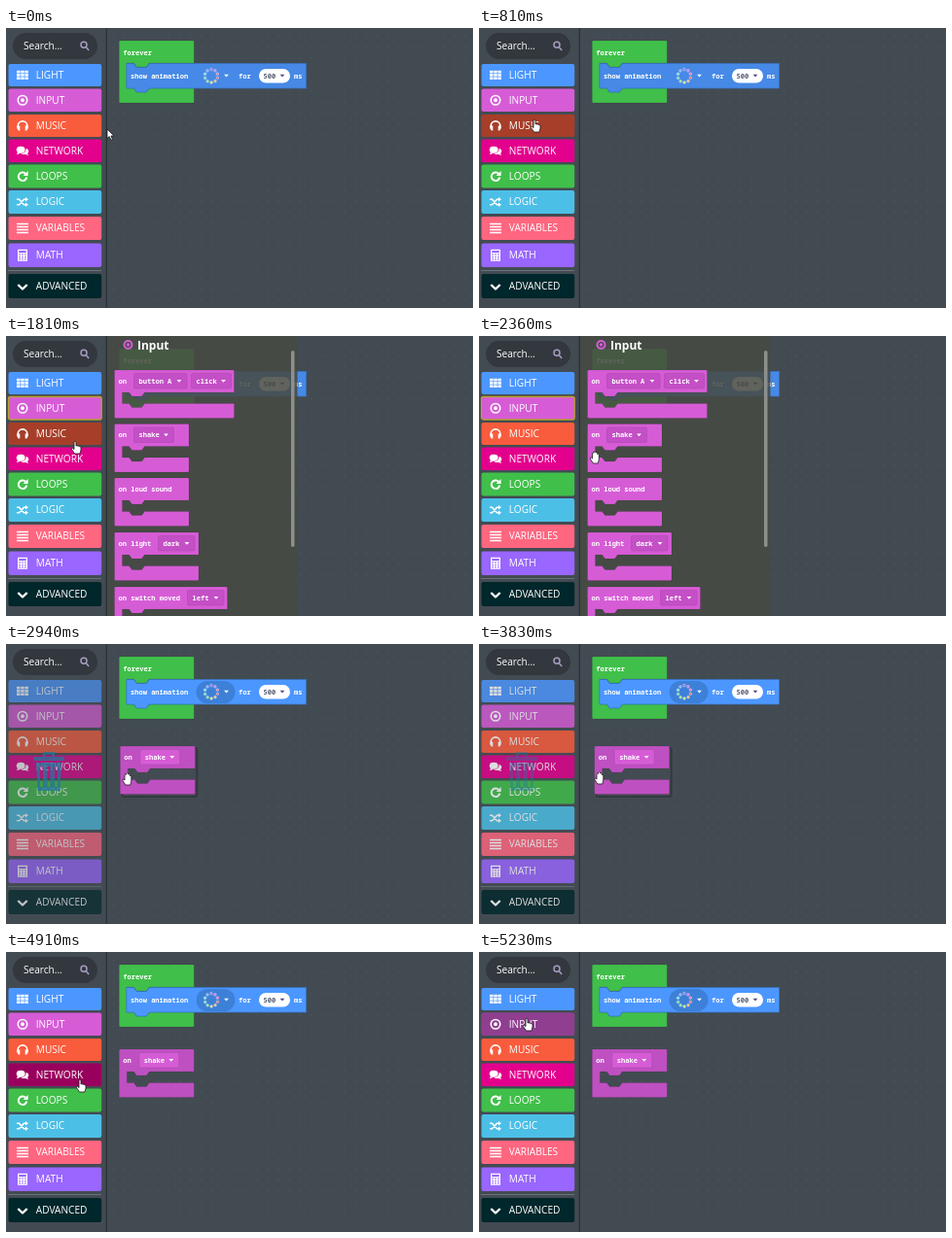
An HTML page for the animation above (5310 ms loop, 480 by 288 pixels).

```html
<!DOCTYPE html>
<html lang="en">
<head>
<meta charset="utf-8">
<title>Block editor</title>
<style>
html, body { margin: 0; width: 100%; height: 100%; overflow: hidden; background: #434b52; }
svg { display: block; width: 480px; height: 288px; }
text { fill: #fff; font: 10.1px "Open Sans", "Noto Sans", sans-serif; }
.code { font: 600 7.05px "Noto Sans Mono", "DejaVu Sans Mono", monospace; white-space: pre; }
.title { font-size: 12px; font-weight: 700; }
.line { fill: none; stroke: #fff; stroke-width: 1.6; stroke-linejoin: round; }
.solid { fill: #fff; }
</style>
</head>
<body>
<svg id="stage" viewBox="0 0 480 288">
  <defs>
    <pattern id="dots" x="105" y="3" width="11.3" height="11.3" patternUnits="userSpaceOnUse">
      <rect x="5" y="5" width="1.3" height="1.3" fill="#fff" opacity=".06"/>
    </pattern>
  </defs>
  <rect width="480" height="288" fill="#434b52"/>
  <rect x="104" width="376" height="288" fill="url(#dots)"/>
  <g id="program"></g>
  <g id="flyout"></g>
  <g id="dragged"></g>
  <rect width="103" height="288" fill="#434b52"/>
  <rect x="102.7" width="1.3" height="288" fill="#2b3136"/>
  <g id="search">
    <rect x="7" y="5" width="87" height="27" rx="13.5" fill="#32383d"/>
    <text x="18" y="22">Search...</text>
    <g fill="none" stroke="#a89bc4" stroke-width="1.5">
      <circle cx="80" cy="17.3" r="3"/><path d="M82.2 19.7l3 3.2"/>
    </g>
  </g>
  <g id="toolbox"></g>
  <g id="trash" fill="#23769c">
    <path d="M28 116h32v4H28zM38 116v-5h12v5h-2.5v-2.5h-7v2.5z"/>
    <path fill-rule="evenodd" d="M31 122h26l-1.5 29h-23zM35 126v21h3v-21zM42.5 126v21h3v-21zM50 126v21h3v-21z"/>
  </g>
  <g id="cursor" stroke="#1b1b1b" stroke-width=".8" stroke-linejoin="round" fill="#fff">
    <path id="arrow" d="M0 0v9.6l2.2-2 1.7 3.7 1.6-.7-1.6-3.6h3z"/>
    <path id="point" d="M-1 1q1-1.8 2 0v4l1-.4 1 .6 1-.2 1 .8 1 .2v3l-1 4h-5.5l-3-4.5q-.6-1.4.8-1.2l1.7 1.3z"/>
    <path id="palm" d="M-2 2.5q.8-1.4 1.6 0V1q.9-1.4 1.8 0v1q.9-1.2 1.8 0v1.6q.9-1 1.6.2V9l-1 4h-5l-2.8-4.5q-.7-1.6.8-1.4l1.2 1z"/>
  </g>
</svg>
<script>
const LOOP = 5310;
const $ = id => document.getElementById(id);
const PINK = '#d65cd6';

// Toolbox: name, top, height, colour, icon drawn around 0,0
const target = '<circle r="4.7" class="line"/><circle r="1.9" class="solid"/>';
const grid = [-6, -1.8, 2.4].map(x => [-4.7, -1.4, 1.9].map(y =>
  `<rect x="${x}" y="${y}" width="3.5" height="2.6" class="solid"/>`).join('')).join('');
const rows = [
  ['LIGHT', 37, 23, '#4c97ff', grid],
  ['INPUT', 62.5, 23.5, PINK, target],
  ['MUSIC', 89, 23, '#f95c3d',
    '<path class="line" d="M-4.8 2v-2a4.8 4.6 0 0 1 9.6 0v2"/><path class="solid" d="M-5.6 0h2.9v5h-1.5l-1.4-2zM5.6 0h-2.9v5h1.5l1.4-2z"/>'],
  ['NETWORK', 114.5, 23.5, '#e3008c',
    '<ellipse cx="-1.8" cy="-1" rx="4.4" ry="3.4" class="solid"/><path class="solid" d="M-5 1l-1 3 4-1.5zM3.6-2.4c3 1 3.5 4 1.4 5.2l1.2 2-3.2-1.1c-1.8.4-3.6 0-4.6-.9 3.400 0 5.600-2 5.200-5.200z"/>'],
  ['LOOPS', 140.5, 24, '#40bf4a',
    '<path class="line" style="stroke-width:2" d="M3.300-2.600a4.300 4.300 0 1 0 1 3.600"/><path class="solid" d="M5.600-5.500v5h-5z"/>'],
  ['LOGIC', 167, 24, '#4cbfe6',
    '<path class="line" d="M-6-2.700h2.500l5 5.400h2M-6 2.700h2.500l5-5.400h2"/><path class="solid" d="M3-5l3 2.300-3 2.300zM3 .4l3 2.300-3 2.300z"/>'],
  ['VARIABLES', 194, 24, '#ff6680',
    '<path class="line" style="stroke-width:1.400" d="M-6-4.500h12M-6-1.500h12M-6 1.500h12M-6 4.500h12"/>'],
  ['MATH', 221.5, 24.5, '#9966ff',
    '<path class="solid" fill-rule="evenodd" d="M-5-6h10v12h-10zM-3.700-4.700v2.200h7.400v-2.200z"/><path stroke="#9966ff" stroke-width="1.300" stroke-dasharray="1.600 1.200" d="M-3.600-.6h7.800M-3.600 1.800h7.800M-3.600 4.200h7.800"/>'],
  ['ADVANCED', 253, 25, '#00272b',
    '<path class="line" style="stroke-width:2.400" d="M-4.700-1.500l4.700 4.500 4.700-4.500"/>']
];

const text = (x, y, s, extra = 'class="code"') => `<text x="${x}" y="${y}" ${extra}>${s}</text>`;
const caret = (x, y, fill = '#fff') => `<path d="M${x - 2.4} ${y - 1.2}h4.800l-2.400 2.700z" fill="${fill}"/>`;
const TAB = 'l-3 4h-10l-3-4';
const NOTCH = 'l3 4h10l3-4';

// C-shaped block with an opening for inner blocks
function bracket(x, y, w, gap, fill) {
  return `<path d="M${x} ${y + 1}q0-1 1-1h${w - 2}q1 0 1 1v22H${x + 31}${TAB}H${x + 8}v${gap}H${x + 15}` +
    `${NOTCH}H${x + w}v14q0 1-1 1H${x + 1}q-1 0-1-1z" fill="${fill}" stroke="#000" stroke-opacity=".14" stroke-width=".7"/>`;
}

function dropdown(x, y, w, label, fill) {
  return `<rect x="${x}" y="${y}" width="${w}" height="15.500" rx="1.500" fill="${fill}" stroke="#a846ab" stroke-width=".5"/>` +
    text(x + 5, y + 10.1, label) + caret(x + w - 8, y + 7.8);
}

// Event block: label followed by [x offset, width, name] dropdowns
function eventBlock(x, y, w, label, fields, fill = PINK, inset = '#c44fc6') {
  return bracket(x, y, w, 11.5, fill) + text(x + 4, y + 13.5, label) +
    fields.map(([dx, fw, name]) => dropdown(x + dx, y + 3.5, fw, name, inset)).join('');
}

function program() {
  const dots = Array.from({ length: 10 }, (_, i) => {
    const a = i * Math.PI / 5 + .3;
    return `<circle cx="${211 + 6.7 * Math.cos(a)}" cy="${49.3 + 6.7 * Math.sin(a)}" r="1.300" fill="hsl(${i * 36} 75% 68%)" stroke="#e8e4ee" stroke-width=".5"/>`;
  }).join('');
  return bracket(116.3, 13, 77, 26, '#40bf4a') + text(120.3, 27.5, 'forever') +
    `<path id="show" d="M123.800 36.500H131.300${NOTCH}H308.500v25.500H147.300${TAB}H123.800z" stroke="#3573c4" stroke-width=".7"/>` +
    '<rect id="field" x="195.500" y="38" width="40" height="23" rx="11.500" fill="#3d80d8"/>' +
    text(128, 52, 'show animation') + dots + caret(226.5, 49) + text(239, 52, 'for') +
    '<rect x="260" y="42" width="32" height="14.500" rx="7.200" fill="#fff"/>' +
    text(264.5, 52, '500', 'class="code" style="fill:#575e75"') + caret(284, 49, '#5a4a86') + text(296, 52, 'ms');
}

function flyout() {
  return '<rect x="104" width="195.500" height="288" fill="#474a43" opacity=".86"/>' +
    '<g transform="translate(125.500 9)" style="--c:0"><circle r="4" fill="none" stroke="#d65cd6" stroke-width="2"/><circle r="1.700" fill="#d65cd6"/></g>' +
    text(135, 13.5, 'Input', 'class="title"') +
    eventBlock(111.5, 35, 123, 'on', [[20, 54.5, 'button A'], [79, 41, 'click']]) +
    eventBlock(111.5, 90.5, 76.5, 'on', [[20, 41, 'shake']]) +
    eventBlock(111.5, 146, 76.5, 'on loud sound', []) +
    eventBlock(111.5, 202, 86.5, 'on light', [[45, 37.5, 'dark']]) +
    eventBlock(111.5, 258, 116, 'on switch moved', [[75, 37.5, 'left']]) +
    '<rect x="293" y="15" width="3.500" height="202" rx="1.700" fill="#8d8f8c"/>';
}

$('program').innerHTML = program();
$('flyout').innerHTML = flyout();
$('dragged').innerHTML = '<rect id="shadow" x="2" y="2" width="77" height="50" rx="2" fill="none" stroke="#000" stroke-width="2" opacity=".25"/>' +
  eventBlock(0, 0, 77, 'on', [[20.5, 41, 'shake']], '#bf50c1', PINK);
$('toolbox').innerHTML = rows.map(([name, y, h, fill, icon]) =>
  `<g><rect x="2.500" y="${y}" width="95.700" height="${h}" rx="2" fill="${fill}"/>` +
  `<rect class="shade" x="2.500" y="${y}" width="95.700" height="${h}" rx="2" opacity=".33"/>` +
  `<g transform="translate(17 ${y + h / 2})">${icon}</g>` + text(30.8, y + h / 2 + 3.4, name, '') + '</g>').join('') +
  '<path d="M2 249.500h96" stroke="#69717a"/>' +
  '<rect id="focus" x="2.500" y="62.500" width="95.700" height="23.500" rx="2" fill="none" stroke="#b8a22e" stroke-width="1.300"/>';
const shades = [...document.querySelectorAll('.shade')];

// Moves: first change, last change, number of changes, x, y
const pointer = [
  [70, 570, 7, 84, 131], [630, 810, 3, 57, 94], [880, 1100, 4, 49, 72],
  [1650, 1810, 3, 71, 108], [1885, 1960, 2, 99, 124], [2140, 2360, 4, 118.5, 118],
  [2700, 2940, 4, 124, 132], [3020, 3200, 3, 124, 131.5], [3830, 3830, 1, 123, 131],
  [4230, 4290, 2, 121, 128], [4440, 4910, 7, 76, 131], [5000, 5230, 4, 49, 68]
];
const block = [
  [2700, 2940, 4, 117.3, 105], [3020, 3200, 3, 118, 105], [3830, 3830, 1, 118.7, 105],
  [3860, 3860, 1, 119, 105], [4230, 4230, 1, 116.3, 100]
];
const fade = [[2700, 1, .58], [2860, 1, .62], [2940, 1, .66], [3260, 1, .72], [3830, 1, .82], [3860, 1, .86], [4230, 1, 1]];

function place(moves, t, x, y) {
  for (const [from, to, n, nx, ny] of moves) {
    if (t < from) break;
    const step = n > 1 ? (to - from) / (n - 1) : 1;
    const p = Math.min(1, (Math.floor((t - from) / step + 1e-6) + 1) / n);
    x += (nx - x) * p;
    y += (ny - y) * p;
  }
  return [x, y];
}

const show = (id, on) => $(id).setAttribute('visibility', on ? 'visible' : 'hidden');
const move = (id, x, y) => $(id).setAttribute('transform', `translate(${x} ${y})`);

function draw(t) {
  const [x, y] = place(pointer, t, 104, 104);
  const [bx, by] = place(block, t, 111.5, 90.5);
  const open = t >= 1480 && t < 2700;
  const dragging = t >= 2700 && t < 4230;
  const overTools = x < 98;
  const holding = t >= 2290 && t < 4440;

  show('flyout', open);
  show('focus', open);
  show('dragged', t >= 2700);
  show('shadow', dragging);
  show('trash', dragging);
  show('field', t >= 2700);
  $('show').setAttribute('fill', t >= 2700 ? '#4c97ff' : '#4689e6');
  move('dragged', bx, by);

  const alpha = fade.reduce((a, [at, , v]) => t >= at ? v : a, 1);
  $('toolbox').setAttribute('opacity', alpha);
  $('trash').setAttribute('opacity', Math.min(.75, (1 - alpha) * 2.2));

  shades.forEach((el, i) => {
    const [, top, h] = rows[i];
    const hit = overTools && y >= top && y < top + h && !(open && i === 1);
    el.setAttribute('visibility', hit ? 'visible' : 'hidden');
  });

  show('arrow', !overTools && !holding);
  show('point', overTools);
  show('palm', !overTools && holding);
  move('cursor', x, y);
}

const start = performance.now();
function tick() {
  draw((performance.now() - start) % LOOP);
  requestAnimationFrame(tick);
}
draw(0);
requestAnimationFrame(tick);
</script>
</body>
</html>
```
